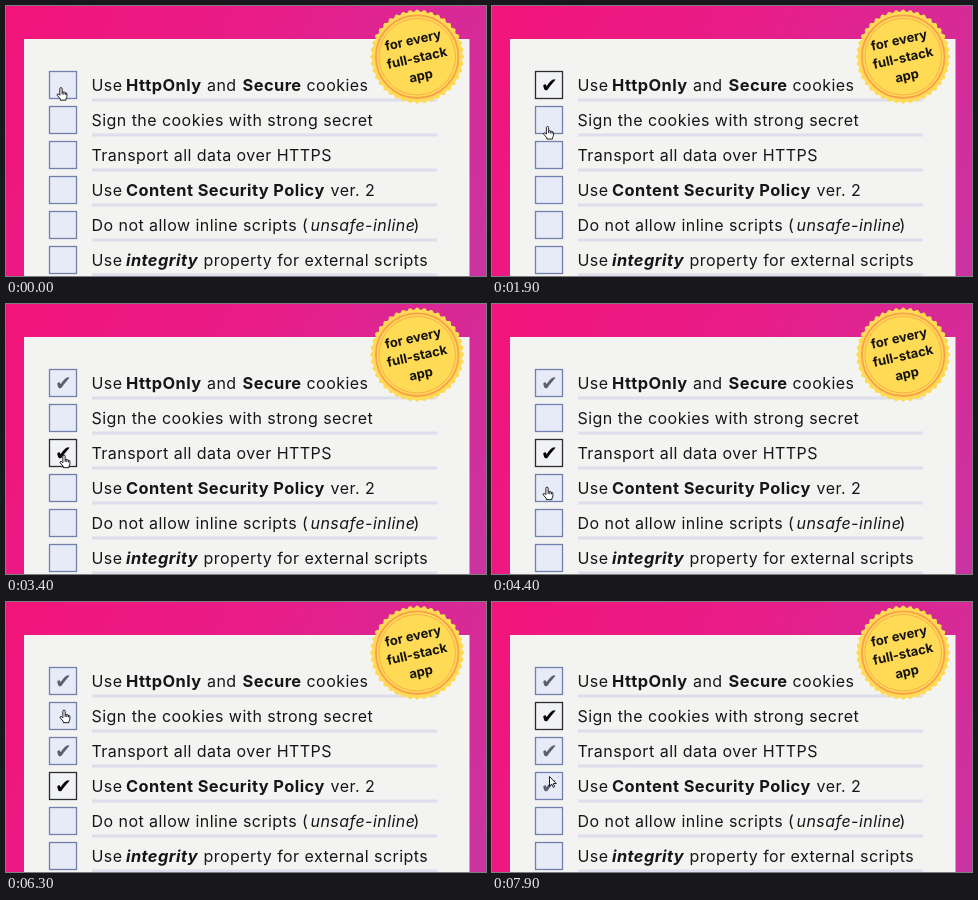
An HTML page with a canvas for the animation above (8000 ms loop, 480 px wide and 270 px high).

```html
<!DOCTYPE html>
<html lang="en">
<head>
<meta charset="utf-8">
<title>Checklist</title>
<style>
html, body { margin: 0; width: 100%; height: 100%; overflow: hidden; background: #e81e8a; }
canvas { display: block; width: 480px; height: 270px; }
</style>
</head>
<body>
<canvas id="stage" width="480" height="270"></canvas>
<script>
const ctx = document.getElementById('stage').getContext('2d');
const LOOP = 8000;
const SANS = 'Inter, "Open Sans", sans-serif';
const BOX = { x: 43.5, y: 65.5, size: 27, pitch: 35 };

// Each row is a list of text runs: [x, text, font style]
const rows = [
  [[86, 'Use'], [120.5, 'HttpOnly', 'bold'], [201.5, 'and'], [237, 'Secure', 'bold'], [301, 'cookies']],
  [[86, 'Sign the cookies with strong secret']],
  [[86, 'Transport all data over HTTPS']],
  [[86, 'Use'], [120.5, 'Content Security Policy', 'bold'], [325, 'ver. 2']],
  [[86, 'Do not allow inline scripts ('], [305, 'unsafe-inline', 'italic'], [408, ')']],
  [[86, 'Use'], [120.5, 'integrity', 'italic bold'], [198, 'property for external scripts']],
];

const clicks = [
  { time: 600, row: 0 },
  { time: 3200, row: 2 },
  { time: 4700, row: 3 },
  { time: 6800, row: 1 },
];

// Pointer tip: [time, x, y]
const path = [
  [0, 55, 82], [700, 55, 82], [1200, 53, 89.5], [1500, 53, 90], [2300, 58, 151.5],
  [3500, 58, 151.5], [4100, 55, 183.5], [4800, 55, 183.5], [5200, 57, 171.5],
  [6100, 58, 108.5], [7200, 58, 108.5], [7900, 57.5, 174.5], [8000, 57.5, 176.5],
];

const rowY = row => BOX.y + row * BOX.pitch;

function pointerAt(time) {
  const i = Math.max(1, path.findIndex(key => key[0] > time));
  const [t0, x0, y0] = path[i - 1];
  const [t1, x1, y1] = path[i];
  const p = (time - t0) / (t1 - t0);
  const e = p * p * (3 - 2 * p);
  return { x: x0 + (x1 - x0) * e, y: y0 + (y1 - y0) * e };
}

function drawBackground() {
  const fill = ctx.createLinearGradient(0, 0, 480, 270);
  fill.addColorStop(0, '#f2147a');
  fill.addColorStop(0.4, '#e91c88');
  fill.addColorStop(1, '#c934a1');
  ctx.fillStyle = fill;
  ctx.fillRect(0, 0, 480, 270);
  ctx.fillStyle = '#f3f4f2';
  ctx.fillRect(18, 33, 445.5, 237);
}

function drawRow(runs, row) {
  ctx.fillStyle = '#dddeeb';
  ctx.fillRect(86, 92.5 + row * BOX.pitch, 345, 3);
  ctx.fillStyle = '#161616';
  ctx.textAlign = 'left';
  ctx.textBaseline = 'alphabetic';
  ctx.letterSpacing = '0.45px';
  for (const [x, text, style = ''] of runs) {
    const size = style.includes('bold') ? 16.4 : 16;
    ctx.font = `${style} ${size}px ${SANS}`;
    ctx.fillText(text, x - 0.5, 84.5 + row * 35.1);
  }
  ctx.letterSpacing = '0px';
}

function drawBox(row, checked, focused) {
  const y = rowY(row);
  ctx.fillStyle = focused ? '#f1f2f5' : '#e6ebf7';
  ctx.strokeStyle = focused ? '#2b2b31' : '#7280ad';
  ctx.lineWidth = 1.3;
  ctx.fillRect(BOX.x, y, BOX.size, BOX.size);
  ctx.strokeRect(BOX.x, y, BOX.size, BOX.size);
  if (!checked) return;
  ctx.fillStyle = focused ? '#060606' : '#596071';
  ctx.font = '20px "DejaVu Sans", sans-serif';
  ctx.textAlign = 'center';
  ctx.textBaseline = 'alphabetic';
  ctx.fillText('✔', 57.3, y + 20.7);
}

function drawRing(radius, width) {
  ctx.beginPath();
  ctx.arc(0, 0, radius, 0, Math.PI * 2);
  ctx.lineWidth = width;
  ctx.stroke();
}

function drawBadge() {
  ctx.save();
  ctx.translate(411.2, 50.7);
  ctx.beginPath();
  for (let i = 0; i <= 360; i++) {
    const a = i * Math.PI / 180;
    const r = 46 + 1.1 * Math.cos(a * 40);
    ctx.lineTo(r * Math.cos(a), r * Math.sin(a));
  }
  ctx.fillStyle = '#ffda55';
  ctx.fill();
  ctx.strokeStyle = '#f9a04b';
  drawRing(41.3, 1.8);
  drawRing(38.3, 0.8);
  ctx.rotate(-12.5 * Math.PI / 180);
  ctx.fillStyle = '#151310';
  ctx.font = `bold 13px ${SANS}`;
  ctx.textAlign = 'center';
  ctx.textBaseline = 'alphabetic';
  ['for every', 'full-stack', 'app'].forEach((line, i) => ctx.fillText(line, -0.5, -12.6 + i * 18.2));
  ctx.restore();
}

const hand = new Path2D('M-1.3 7V.8Q-1.3-.4 0-.4T1.3.8V4.6Q2.4 3.9 3.3 5Q4.5 4.5 5.2 5.6Q6.8 5.3 6.8 7V9.6Q6.8 11 5.7 12.3V14H-.8V12.5L-4.4 8.4Q-4.8 7-3.5 6.8Q-2.6 6.8-1.3 8.4Z');
const knuckles = new Path2D('M1.3 4.6V7.4M3.3 5V7.6M5.2 5.6V7.8');
const arrow = new Path2D('M0 0V11L2.6 8.7L4.3 12.5L6 11.7L4.3 8.1H7.8Z');

function drawPointer({ x, y }, isHand) {
  ctx.save();
  ctx.translate(x, y);
  ctx.scale(0.87, 0.87);
  ctx.fillStyle = '#fff';
  ctx.strokeStyle = '#16161a';
  ctx.lineWidth = 1.1;
  ctx.lineJoin = 'round';
  const shape = isHand ? hand : arrow;
  ctx.fill(shape);
  ctx.stroke(shape);
  if (isHand) ctx.stroke(knuckles);
  ctx.restore();
}

function draw(time) {
  const done = clicks.filter(click => click.time <= time).map(click => click.row);
  const focus = done.at(-1);
  drawBackground();
  rows.forEach((runs, row) => {
    drawRow(runs, row);
    drawBox(row, done.includes(row), row === focus);
  });
  drawBadge();

  const tip = pointerAt(time);
  const hovered = rows.findIndex((_, row) => tip.y >= rowY(row) && tip.y <= rowY(row) + BOX.size);
  const clickable = hovered >= 0 && (hovered === focus || !done.includes(hovered));
  drawPointer(tip, clickable);
}

const start = performance.now();
function tick() {
  draw((performance.now() - start) % LOOP);
  requestAnimationFrame(tick);
}
tick();
</script>
</body>
</html>
```
